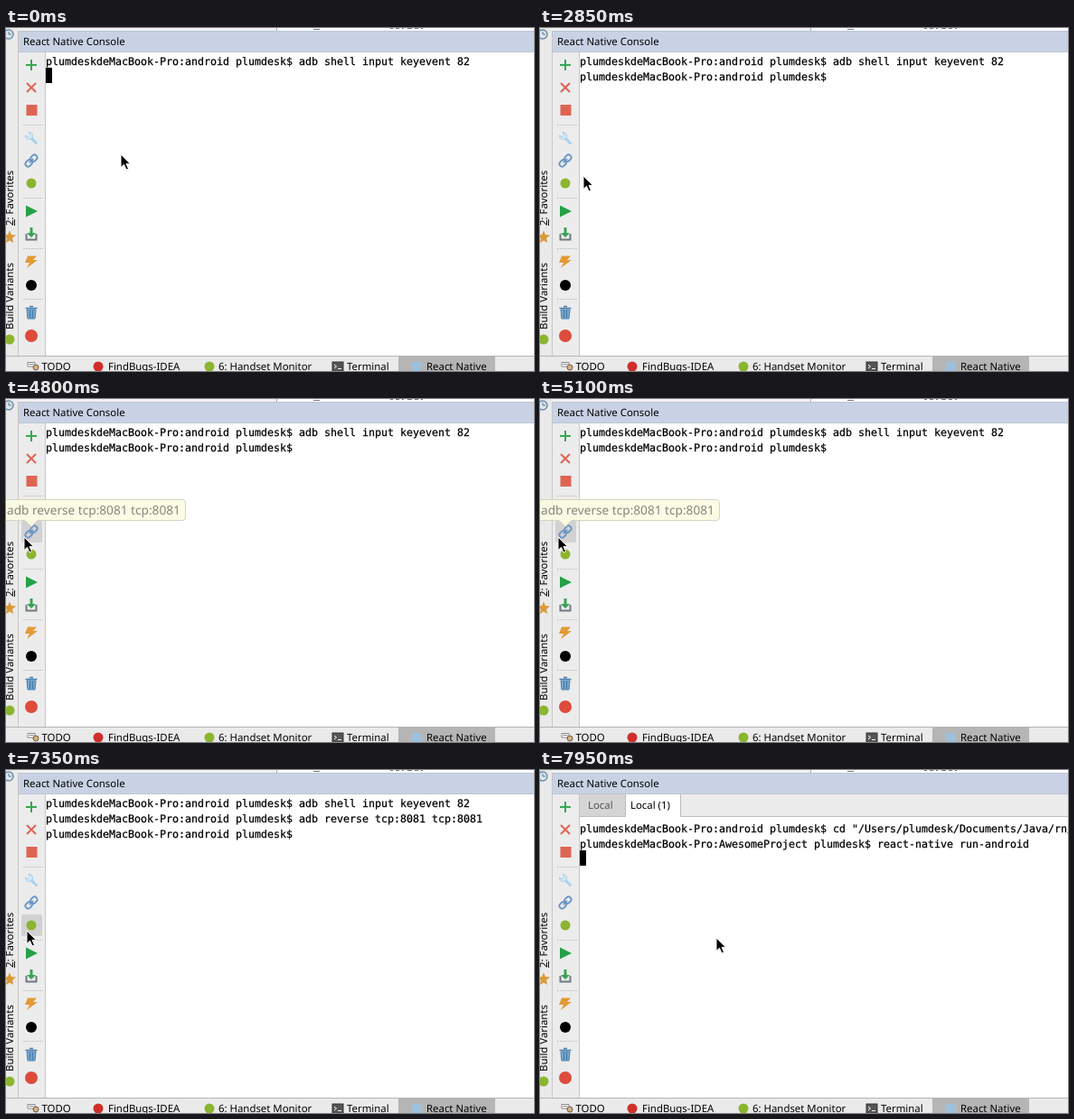
An HTML page for the animation above (8 s loop, 584 px wide and 380 px high).

```html
<!DOCTYPE html>
<html lang="en">
<head>
<meta charset="utf-8">
<title>Console</title>
<style>
  html, body { margin: 0; width: 100%; height: 100%; overflow: hidden; background: #fff; }
  svg { display: block; }
  text { font: 11.4px "Noto Sans", "Open Sans", sans-serif; fill: #000; text-rendering: geometricPrecision; }
  #rows text { font: 11.63px "DejaVu Sans Mono", "Liberation Mono", monospace; stroke: #000; stroke-width: .25; }
  #tip text { font-size: 13.65px; fill: #858580; }
  .line { fill: none; stroke-width: 2; }
</style>
</head>
<body>
<svg width="584" height="380" viewBox="0 0 584 380">
  <!-- window chrome -->
  <rect width="584" height="380" fill="#fff"/>
  <path d="M0 0H299V3H0Z" fill="#f1f1f1"/>
  <path d="M299.5 0V3" stroke="#aaa"/>
  <path d="M340 1.5h7M425 .5h3m3 0h4m3 0h2m4 0h5m3 0h4m3 0h2" stroke="#777"/>
  <rect width="13" height="380" fill="#eaeaea"/>
  <rect x="13" y="3" width="571" height="24" fill="#c8d2e4"/>
  <path d="M13 3.5H584M13 26.5H584" stroke="#bcc5d5"/>
  <rect x="14" y="27" width="29" height="336" fill="#ececec"/>
  <path d="M13.5 3V363M43.5 27V363" stroke="#c6c6c6"/>
  <rect y="363" width="584" height="17" fill="#eaeaea"/>
  <path d="M0 363.5H584" stroke="#b4b4b4"/>
  <rect x="434" y="364" width="107" height="16" fill="#b5b5b5"/>
  <text x="19" y="19">React Native Console</text>

  <!-- left strip -->
  <circle cx="3" cy="7" r="5" fill="#dce8f1" stroke="#6f8ca3" stroke-width="1.5"/>
  <path d="M3 4V7H6" fill="none" stroke="#58758c"/>
  <text transform="translate(8 219) rotate(-90)">2: Favorites</text>
  <path d="M9.5 212V219" stroke="#111"/>
  <path d="M4 224.500l2 4.500 5 .5-4 3.500 1.200 5-4.200-2.600-4.200 2.600 1.200-5-4-3.500 5-.5z" fill="#d99a3a"/>
  <text transform="translate(8 334) rotate(-90)">Build Variants</text>
  <circle cx="4" cy="345" r="5.500" fill="#8bb52f"/>

  <!-- toolbar -->
  <rect id="hover" x="17" width="23" height="24" rx="2" fill="#d2d2d2"/>
  <path class="line" d="M22 41H34M28 35V47" stroke="#36a853"/>
  <path class="line" d="M23 61L33 71M33 61L23 71" stroke="#df6455"/>
  <rect x="22.500" y="85" width="12" height="12" fill="#df6553"/>
  <path d="M19 107.500H41M19 188.500H41M19 244.500H41M19 300.500H41" stroke="#c4c4c4" stroke-dasharray="2 1"/>
  <path d="M27 121L33.500 127.500" stroke="#a9d0ee" stroke-width="3" stroke-linecap="round"/>
  <path d="M25 115.500A4 4 0 1 1 21.500 119L24.500 121L27 118.500Z" fill="#d9ecf9" stroke="#a3cbe8"/>
  <g transform="rotate(-45 28 147)" fill="none" stroke="#6a95c4" stroke-width="1.8">
    <rect x="20" y="144" width="8" height="6" rx="3"/>
    <rect x="28" y="144" width="8" height="6" rx="3"/>
    <path d="M25 147H31"/>
  </g>
  <circle cx="28" cy="172" r="5.500" fill="#8bb52f"/>
  <path d="M22 196.500L35 203L22 209.500Z" fill="#24a148"/>
  <path class="line" d="M22.500 228V234.500H33.500V228" stroke="#6f7b80"/>
  <path d="M26.500 221H29.500V227H33L28 232L23 227H26.500Z" fill="#37a455"/>
  <path d="M24 252.500H34L30 257H35L23 266L26 260H21Z" fill="#e39a35"/>
  <circle cx="28" cy="285" r="6" fill="#000"/>
  <path d="M23 312H33L32 322H24Z" fill="#7eacd2" stroke="#477caa"/>
  <path d="M21.500 310.500H34.500M26 308.500H30M26.500 313V321M29.500 313V321" stroke="#477caa" stroke-width="1.500"/>
  <circle cx="28" cy="341" r="7" fill="#dd4b3c"/>

  <!-- bottom tabs -->
  <path d="M24 370.500H32V375H24Z" fill="#fff" stroke="#888"/>
  <path d="M25.500 372.500H30.500" stroke="#888"/>
  <circle cx="33" cy="376" r="3" fill="#d8b07c" stroke="#6b5a48"/>
  <text x="39.500" y="379">TODO</text>
  <circle cx="102" cy="375" r="5.500" fill="#cf2f2a"/>
  <text x="113" y="379">FindBugs-IDEA</text>
  <circle cx="225" cy="375" r="5.500" fill="#8bb52f"/>
  <text x="235" y="379">6: Handset Monitor</text>
  <rect x="361" y="370" width="12" height="11" fill="#555" stroke="#333"/>
  <path d="M363 373L365.500 375L363 377M367 377.500H371" fill="none" stroke="#fff"/>
  <text x="377" y="379">Terminal</text>
  <rect x="449" y="370" width="11" height="10" fill="#9fc0dc"/>
  <text x="465" y="379">React Native</text>

  <!-- console -->
  <g id="tabs">
    <rect x="44" y="27" width="540" height="24" fill="#ececec"/>
    <rect x="44" y="27" width="50" height="24" fill="#d5d5d5"/>
    <rect x="95" y="27" width="60" height="25" fill="#fff"/>
    <path d="M44 51.500H94.500V27M155.500 27V51.500H584" fill="none" stroke="#bcbcbc"/>
    <text x="53" y="43" style="fill:#555">Local</text>
    <text x="100" y="43">Local (1)</text>
  </g>
  <g id="rows"></g>
  <rect id="caret" width="7" height="17"/>
  <g id="tip">
    <path d="M-5 111.500H195Q198.500 111.500 198.500 115V131Q198.500 134.500 195 134.500H35L28 141.500L21 134.500H-5Z" fill="#fcfce2" fill-opacity=".9" stroke="#d3d3c4"/>
    <text x="1" y="128">adb reverse tcp:8081 tcp:8081</text>
  </g>
  <path id="mouse" d="M0 0V14.500L3.500 11.300L6 17L8.500 15.900L6 10.400H10.500Z" fill="#000" stroke="#fff"/>
</svg>
<script>
const LOOP = 8000, STEP = 150, CELL = 7, ROW = 17, LEFT = 44;
const el = id => document.getElementById(id);
const [hover, tabs, rows, caret, tip, mouse] =
  ["hover", "tabs", "rows", "caret", "tip", "mouse"].map(el);

const prompt = dir => `plumdeskdeMacBook-Pro:${dir} plumdesk$ `;
const home = prompt("android");
const keyevent = home + "adb shell input keyevent 82";
const reverse = home + "adb reverse tcp:8081 tcp:8081";

// start time and console lines; the caret follows the last line
const screens = [
  [0, [keyevent, ""]],
  [600, [keyevent, home]],
  [5400, [keyevent, reverse, ""]],
  [5550, [keyevent, reverse, home]],
  [7800, [home + 'cd "/Users/plumdesk/Documents/Java/rn/',
          prompt("AwesomeProject") + "react-native run-android", ""]],
];
const blinks = [150, 600, 1650, 2100, 2550, 3150, 3600, 4200, 4650, 5250, 6150, 6600, 7050, 7500];

// time, x, y of the pointer tip
const path = [
  [0, 127, 140], [150, 127, 141], [2400, 127, 141], [2850, 48, 164], [3150, 22, 163],
  [3300, 21, 154], [3450, 21, 154], [3600, 20, 153], [5400, 20, 153], [5550, 17, 181],
  [5850, 17, 182], [6150, 17, 183], [6300, 17, 183], [6450, 18, 187], [6750, 20, 186],
  [6900, 20, 186], [7050, 21, 184], [7200, 21, 184], [7350, 23, 178], [7500, 23, 178],
  [7950, 195, 186],
];

function pointerAt(t) {
  const next = path.findIndex(key => key[0] > t);
  if (next < 0) return path.at(-1).slice(1);
  const a = path[next - 1], b = path[next];
  const k = (t - a[0]) / (b[0] - a[0]);
  return [1, 2].map(i => Math.round(a[i] + (b[i] - a[i]) * k));
}

const show = (node, on) => node.setAttribute("visibility", on ? "visible" : "hidden");

let shown;
function drawConsole(t) {
  const [start, lines] = screens.findLast(s => s[0] <= t);
  const newTab = start >= 7800;
  const top = newTab ? 55 : 27;
  if (shown !== lines) {
    shown = lines;
    rows.innerHTML = lines.map((line, i) =>
      `<text x="${LEFT}" y="${top + i * ROW + 14}">${line}</text>`).join("");
  }
  show(tabs, newTab);
  caret.setAttribute("x", LEFT + lines.at(-1).length * CELL);
  caret.setAttribute("y", top + (lines.length - 1) * ROW);
  show(caret, blinks.filter(b => b <= t).length % 2 === 0);
}

function drawPointer(t) {
  const [x, y] = pointerAt(t);
  mouse.setAttribute("transform", `translate(${x} ${y})`);
  const onLink = y < 160;
  show(hover, x >= 16 && x <= 41 && y >= 135 && y < 190);
  hover.setAttribute("y", onLink ? 135 : 160);
}

function frame(now) {
  const t = Math.floor(now % LOOP / STEP) * STEP;
  drawConsole(t);
  drawPointer(t);
  show(tip, t >= 4650 && t < 5250);
  tip.setAttribute("opacity", t < 4800 ? 0.5 : 1);
  requestAnimationFrame(frame);
}
frame(performance.now());
</script>
</body>
</html>
```
